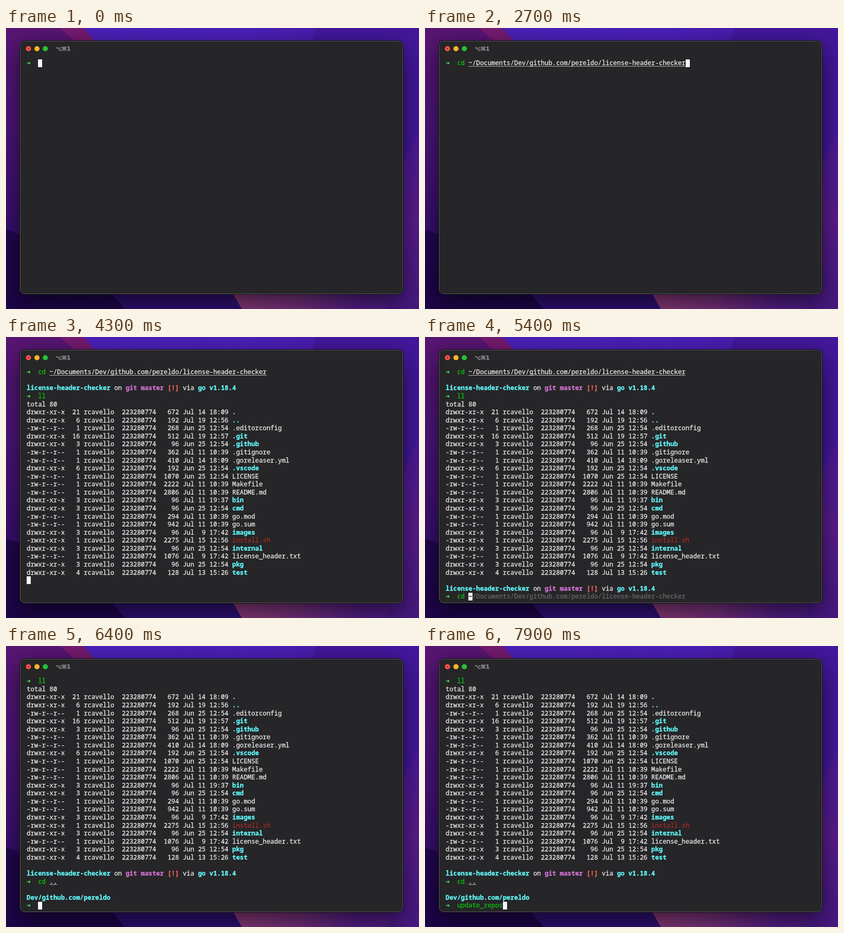
Recreate the animation shown at these times as an HTML page with a canvas. Size 800 by 546 pixels, loop 8 s.

```html
<!DOCTYPE html>
<html lang="en">
<head>
<meta charset="utf-8">
<title>Terminal session</title>
<style>
  html, body { margin: 0; width: 100%; height: 100%; overflow: hidden; background: #2c0f6a; }
  canvas { display: block; }
</style>
</head>
<body>
<canvas id="stage" width="800" height="546"></canvas>
<script>
const ctx = document.getElementById('stage').getContext('2d');
const LOOP = 8000, LEFT = 40, TOP = 60.6, CELL = 7.375, ROW = 15.57, ROWS = 29;
const MONO = '12.29px "Noto Sans Mono", "DejaVu Sans Mono", monospace';
const SYMBOLS = '"DejaVu Sans", sans-serif';
const USER = 'pereldo', OWNER = 'rcavello';
const HOME = `~/Documents/Dev/github.com/${USER}/license-header-checker`;

// style: [colour, bold, underlined]
const STYLES = {
  text: ['#ecebec'], path: ['#ecebec', false, true], ghost: ['#69686a'],
  command: ['#0cc30f'], arrow: ['#42e45d', true], folder: ['#62fbfd', true],
  branch: ['#d573d8', true], alert: ['#ee6558', true], script: ['#a62c25']
};

const MODES = { d: 'drwxr-xr-x', f: '-rw-r--r--', x: '-rwxr-xr-x' };
const FILES = `d 21 672 Jul 14 18:09 .
d 6 192 Jul 19 12:56 ..
f 1 268 Jun 25 12:54 .editorconfig
d 16 512 Jul 19 12:57 .git
d 3 96 Jun 25 12:54 .github
f 1 362 Jul 11 10:39 .gitignore
f 1 410 Jul 14 18:09 .goreleaser.yml
d 6 192 Jun 25 12:54 .vscode
f 1 1070 Jun 25 12:54 LICENSE
f 1 2222 Jul 11 10:39 Makefile
f 1 2806 Jul 11 10:39 README.md
d 3 96 Jul 11 19:37 bin
d 3 96 Jun 25 12:54 cmd
f 1 294 Jul 11 10:39 go.mod
f 1 942 Jul 11 10:39 go.sum
d 3 96 Jul 9 17:42 images
x 1 2275 Jul 15 12:56 install.sh
d 3 96 Jun 25 12:54 internal
f 1 1076 Jul 9 17:42 license_header.txt
d 3 96 Jun 25 12:54 pkg
d 4 128 Jul 13 15:26 test`.split('\n').map(entry => {
  const [kind, links, size, month, day, time, name] = entry.split(' ');
  return [
    [`${MODES[kind]} ${links.padStart(3)} ${OWNER}  223280774 ${size.padStart(5)} ` +
     `${month} ${day.padStart(2)} ${time} `, 'text'],
    [name, { d: 'folder', f: 'text', x: 'script' }[kind]]
  ];
});

const REPO = [
  ['license-header-checker', 'folder'], [' on ', 'text'], ['git master ', 'branch'],
  ['[!]', 'alert'], [' via ', 'text'], ['go v1.18.4', 'folder']
];

function input(typed, ghost = '') {
  const [, name, arg] = typed.match(/^(\S* ?)(.*)$/);
  return [['➜', 'arrow'], ['  ', 'text'], [name, 'command'], [arg, 'path'], [ghost, 'ghost']];
}

// The lines on screen at time t; the cursor is always on the last one.
function session(t) {
  const type = (text, ...at) => text.slice(0, at.filter(a => a <= t).length);
  const full = 'cd ' + HOME;

  if (t < 1800) return [input(type('cd ~', 1200, 1300, 1500, 1700))];
  if (t < 2500) return [input('cd ~', HOME.slice(1))];
  const lines = [input(full)];
  if (t < 2900) return lines;
  lines.push([]);
  if (t < 3000) return lines;

  lines.push(REPO, input(type('ll', 3600, 3800)));
  if (t < 4300) return lines;
  lines.push([['total 80', 'text']], ...FILES, []);
  if (t < 4400) return lines;

  const back = type('cd ..', 4900, 5100, 5400, 5600, 5800);
  const hint = back && back.length < 4 ? full.slice(back.length) : '';
  lines.push(REPO, input(back, hint));
  if (t < 6100) return lines;
  lines.push([]);
  if (t < 6200) return lines;

  const keys = Array.from('update_repos', (_, i) => 6600 + i * 110);
  lines.push([[`Dev/github.com/${USER}`, 'folder']], input(type('update_repos', ...keys)));
  return lines;
}

function shape(fill, ...points) {
  ctx.fillStyle = fill;
  ctx.beginPath();
  points.forEach(([x, y]) => ctx.lineTo(x, y));
  ctx.fill();
}

function gradient(x0, y0, x1, y1, ...colours) {
  const g = ctx.createLinearGradient(x0, y0, x1, y1);
  colours.forEach((c, i) => g.addColorStop(i / (colours.length - 1), c));
  return g;
}

function drawDesktop() {
  shape(gradient(150, 0, 800, 0, '#4a20b8', '#4b1fb9', '#45199f'), [0, 0], [800, 0], [800, 546], [0, 546]);
  shape('#43179c', [600, 0], [800, 0], [800, 300], [592, 30]);
  shape(gradient(0, 0, 0, 400, '#581573', '#4c147a', '#360e6c'), [0, 0], [108, 0], [140, 30], [140, 420], [0, 420]);
  shape('#761a70', [104, 0], [150, 0], [176, 30], [140, 30]);
  shape('#2e1070', [0, 420], [500, 420], [500, 546], [0, 546]);
  shape(gradient(0, 392, 0, 546, '#220650', '#1c0549'), [0, 392], [40, 404], [200, 510], [230, 546], [0, 546]);
  shape(gradient(440, 0, 800, 0, '#8a3a78', '#77307c', '#531d85', '#481981'), [436, 510], [800, 440], [800, 546], [457, 546]);
  shape(gradient(0, 200, 0, 546, '#4c199a', '#581c8c', '#471881'), [800, 200], [800, 546], [740, 546], [740, 320]);
}

function box(x, y, w, h, r, fill) {
  ctx.fillStyle = fill;
  ctx.beginPath();
  ctx.roundRect(x, y, w, h, r);
  ctx.fill();
}

function dot(x, y, r, fill) {
  ctx.fillStyle = fill;
  ctx.beginPath();
  ctx.arc(x, y, r, 0, Math.PI * 2);
  ctx.fill();
}

// A hairline outline gives the text its medium weight.
function print(text, x, y, font, colour, weight) {
  ctx.font = font;
  ctx.fillStyle = ctx.strokeStyle = colour;
  ctx.lineWidth = weight;
  ctx.fillText(text, x, y);
  ctx.strokeText(text, x, y);
}

function drawWindow() {
  ctx.save();
  ctx.shadowColor = 'rgba(0,0,0,.58)';
  ctx.shadowBlur = 48;
  ctx.shadowOffsetY = 15;
  box(26, 24, 744, 494, 10, '#0c0912');
  ctx.restore();
  box(27, 25, 742, 492, 9, '#59575b');
  box(28, 26, 740, 490, 8, '#262527');
  dot(43.5, 40.3, 5, '#f4544c');
  dot(43.5, 40.3, 1.3, '#811c18');
  dot(60, 40.3, 5, '#fbb52a');
  dot(76.2, 40.3, 5, '#28c03a');
  print('⌥⌘1', 96, 44, 'bold 10.5px ' + SYMBOLS, '#898789', .5);
}

function drawGlyph(char, col, row, colour, bold) {
  const arrow = char === '➜';
  const font = arrow ? '9.5px ' + SYMBOLS : (bold ? 'bold ' : '') + MONO;
  print(char, LEFT + col * CELL, TOP + row * ROW + (arrow ? 10.7 : 11.7), font, colour, .3);
}

function drawLine(line, row) {
  let col = 0;
  for (const [text, style] of line) {
    const [colour, bold, underlined] = STYLES[style];
    if (underlined && text) {
      ctx.fillStyle = '#b9b8b9';
      ctx.fillRect(LEFT + col * CELL, Math.round(TOP + row * ROW + 13.4), text.length * CELL, 1);
    }
    for (const char of text) {
      if (char !== ' ') drawGlyph(char, col, row, colour, bold);
      col++;
    }
  }
}

function drawCursor(line, row, thin) {
  const before = line.filter(([, style]) => style !== 'ghost');
  const col = before.reduce((n, [text]) => n + text.length, 0);
  const x = Math.round(LEFT + col * CELL), y = Math.round(TOP + row * ROW);
  ctx.fillStyle = thin ? '#f0b23c' : '#fbf5fb';
  ctx.fillRect(x, y, thin ? 2 : 8, 15);
  const under = line.find(([text, style]) => style === 'ghost' && text);
  if (under) drawGlyph(under[0][0], col, row, '#262527', true);
}

function draw(now) {
  const t = Math.floor(now % LOOP / 100) * 100;
  const lines = session(t).slice(-ROWS);
  drawDesktop();
  drawWindow();
  lines.forEach(drawLine);
  drawCursor(lines.at(-1), lines.length - 1, t === 1700);
}

ctx.lineJoin = 'round';
const start = performance.now();
function tick() {
  draw(performance.now() - start);
  requestAnimationFrame(tick);
}
tick();
</script>
</body>
</html>
```
